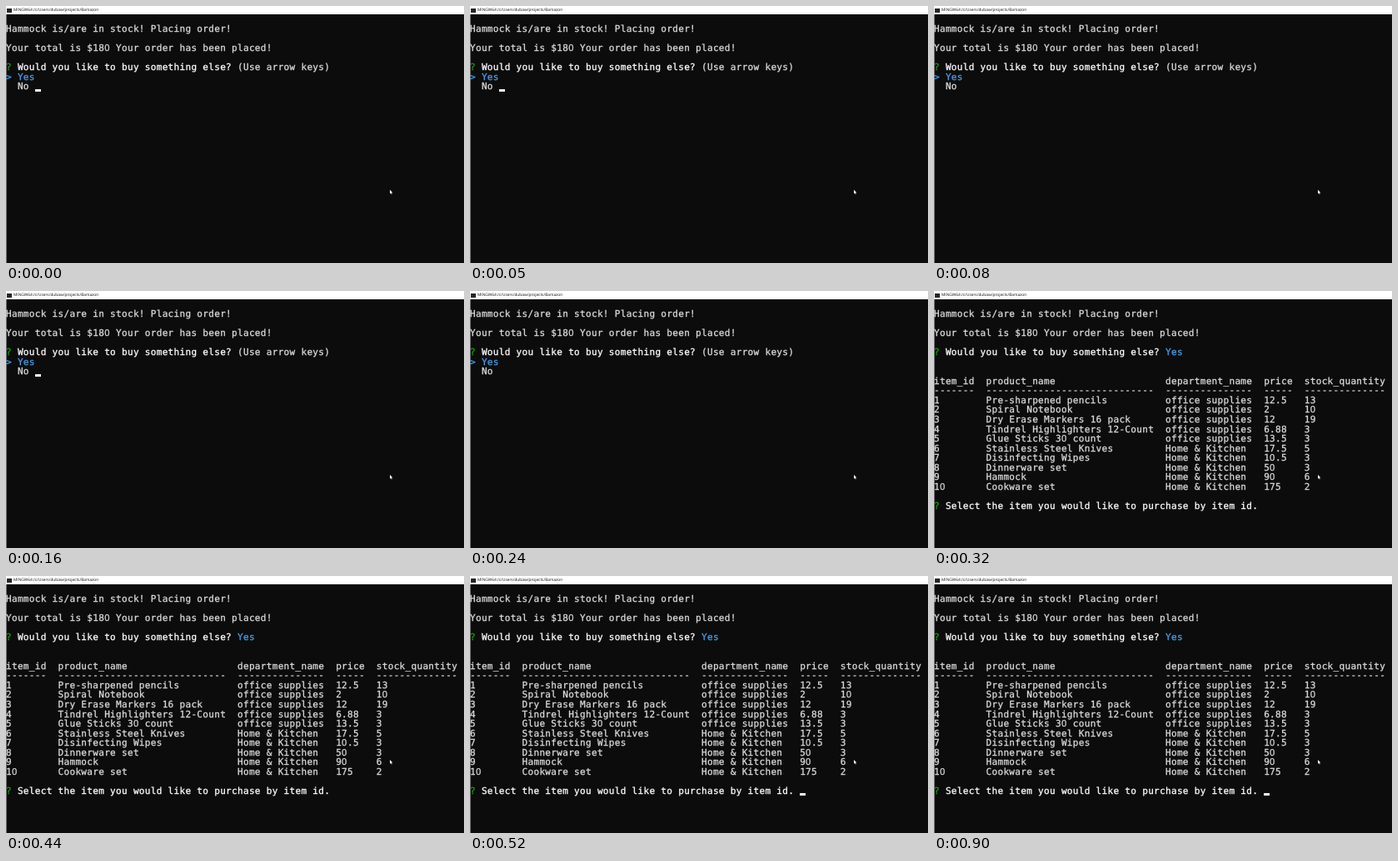
Recreate the animation shown at these times as an HTML page. Size 550 by 309 pixels, loop 1.16 s.

```html
<!DOCTYPE html>
<html lang="en">
<head>
<meta charset="utf-8">
<title>Terminal shop</title>
<style>
  html, body { margin: 0; width: 100%; height: 100%; overflow: hidden; background: #0c0c0c; }
  body { position: relative; --row: 11.55px; --col: 6.95px; --loop: 1160ms step-end infinite; }

  .edge { position: absolute; left: 0; top: 10px; bottom: 0; width: 1px; background: #6a6a6a; }
  .bar { position: absolute; inset: 0 0 auto; height: 10px; background: #fff; }
  .bar i { position: absolute; left: 1px; top: 3px; width: 6px; height: 5px; background: #262626; }
  .bar span {
    position: absolute; left: 9px; top: 1px; color: #111; white-space: nowrap;
    font: 4.82px/9px "Open Sans", sans-serif; text-rendering: geometricPrecision;
  }

  /* Everything in the terminal sits on a character grid: --r rows, --c columns */
  pre, .cursor {
    position: absolute; margin: 0;
    left: calc(var(--c, 0) * var(--col));
    top: calc(22px + var(--r, 0) * var(--row));
  }
  pre {
    color: #dadada; letter-spacing: .327px; text-rendering: geometricPrecision;
    font: 11px/var(--row) "DejaVu Sans Mono", monospace;
    -webkit-text-stroke: .3px;
  }
  pre i { font: 11px/0 "Open Sans", sans-serif; letter-spacing: .66px; }
  .cursor { width: 7px; height: 3px; margin-top: 8.4px; background: #f8f8f8; }

  b { font-weight: normal; color: #fff; }
  .q { color: #13a10e; }
  .a { color: #42a0ec; }

  .menu { animation: menu var(--loop); }
  .list { animation: list var(--loop); }
  .blink { animation: blink var(--loop); }
  .wait { animation: wait var(--loop); }
  @keyframes menu { 0% { visibility: visible } 27.586%, 100% { visibility: hidden } }
  @keyframes list { 0% { visibility: hidden } 27.586%, 100% { visibility: visible } }
  @keyframes blink {
    0%, 13.793% { visibility: visible }
    6.8965%, 20.6896%, 100% { visibility: hidden }
  }
  @keyframes wait { 0% { visibility: hidden } 44.827%, 100% { visibility: visible } }

  .mouse { position: absolute; left: 461px; top: 221px; }
</style>
</head>
<body>
<div class="edge"></div>
<div class="bar"><i></i><span>MINGW64:/c/Users/dubaw/projects/Bamazon</span></div>

<pre>Hammock is/are in stock! Placing order!

Your total is $18<i>0</i> Your order has been placed!

<span class="q">?</span> <b>Would you like to buy something else?</b></pre>

<div class="menu">
<pre style="--r:4;--c:40">(Use arrow keys)</pre>
<pre style="--r:5"><span class="a">&gt; Yes</span>
  No</pre>
</div>
<div class="cursor blink" style="--r:6;--c:5"></div>

<div class="list">
<pre class="a" style="--r:4;--c:40">Yes</pre>
<pre style="--r:7">item_id
-------
1
2
3
4
5
6
7
8
9
1<i>0</i></pre>
<pre style="--r:7;--c:9">product_name
-----------------------------
Pre-sharpened pencils
Spiral Notebook
Dry Erase Markers 16 pack
Tindrel Highlighters 12-Count
Glue Sticks 3<i>0</i> count
Stainless Steel Knives
Disinfecting Wipes
Dinnerware set
Hammock
Cookware set</pre>
<pre style="--r:7;--c:40">department_name
---------------
office supplies
office supplies
office supplies
office supplies
office supplies
Home &amp; Kitchen
Home &amp; Kitchen
Home &amp; Kitchen
Home &amp; Kitchen
Home &amp; Kitchen</pre>
<pre style="--r:7;--c:57">price
-----
12.5
2
12
6.88
13.5
17.5
1<i>0</i>.5
5<i>0</i>
9<i>0</i>
175</pre>
<pre style="--r:7;--c:64">stock_quantity
--------------
13
1<i>0</i>
19
3
3
5
3
3
6
2</pre>
<pre style="--r:20"><span class="q">?</span> <b>Select the item you would like to purchase by item id.</b></pre>
</div>
<div class="cursor wait" style="--r:20;--c:57"></div>

<svg class="mouse" width="4" height="6"><path d="M0 0V4.8L1.1 3.8L1.9 5.5L2.6 5.2L1.9 3.5H3.4Z" fill="#fff"/></svg>
</body>
</html>
```
